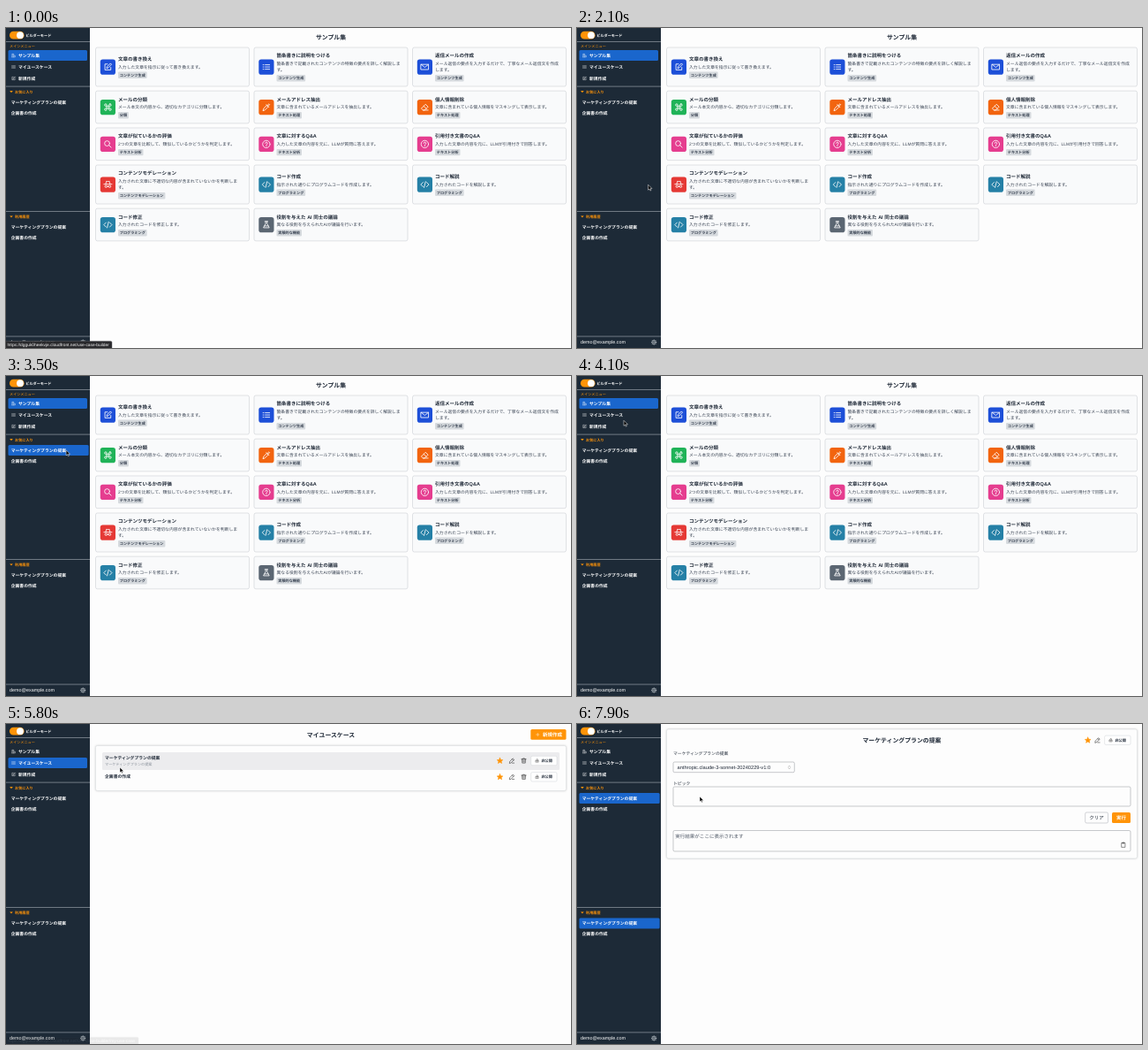
Recreate the animation shown at these times as an HTML page. Size 640 by 362 pixels, loop 8000 ms.

```html
<!DOCTYPE html>
<html lang="ja">
<head>
<meta charset="utf-8">
<title>ユースケースビルダー</title>
<style>
html, body { margin: 0; width: 100%; height: 100%; overflow: hidden; background: #fdfdfd; }
svg { display: block; width: 640px; height: 362px; }
text { font-family: "Liberation Sans", "Noto Sans CJK JP", "Noto Sans CJK", sans-serif; text-rendering: geometricPrecision; white-space: pre; }
.panel { filter: drop-shadow(0 .5px .8px #0003); }
</style>
</head>
<body>
<svg id="stage" viewBox="0 0 640 362"></svg>
<script>
const LOOP = 8000, OPEN_LIST = 4900, OPEN_FORM = 6700;
const ORANGE = '#ff9408', BLUE = '#1a66cc', NAVY = '#1d2a37', INK = '#1f2937';
const XS = 4.15, SM = 4.83, MD = 5.52, XL = 6.9;
const PLAN = 'マーケティングプランの提案', DOC = '企画書の作成';
const SITE = 'https://dgguk0heekvje.cloudfront.net/use-case-builder';

// Icons are drawn in a 24-unit box
const ICONS = {
  edit: 'M11 4H4v16h16v-7M9 15l1-4 9-9 3 3-9 9z',
  list: 'M3 6h2M9 6h12M3 12h2M9 12h12M3 18h2M9 18h12',
  mail: 'M2 5h20v14H2zl10 8 10-8',
  group: 'M18 3a3 3 0 0 0-3 3v12a3 3 0 1 0 3-3H6a3 3 0 1 0 3 3V6a3 3 0 1 0-3 3h12a3 3 0 0 0 0-6z',
  dropper: 'M3 21l2-6 8-8 4 4-8 8zM12 5l7 7M15 7l4-4 2 2-4 4',
  eraser: 'M3 15 14 4l7 7-9 9H8zM9 9l7 7M8 20h13',
  search: 'M17 10a7 7 0 1 0-14 0a7 7 0 1 0 14 0M15 15l6 6',
  help: 'M22 12a10 10 0 1 0-20 0a10 10 0 1 0 20 0M9 9.500a3 3 0 1 1 4 3q-1 .5-1 2M12 17v.5',
  agent: 'M1 11h22M6 11l2-8 4 1 4-1 2 8M10 17a3 3 0 1 0-6 0a3 3 0 1 0 6 0h4a3 3 0 1 0 6 0a3 3 0 1 0-6 0',
  code: 'M7 6l-6 6 6 6M17 6l6 6-6 6M14 4l-4 16',
  flask: 'M8 3h8M10 3v6L4 20h16L14 9V3M7 15h10',
  trash: 'M3 6h18M9 6V3h6v3M5 6l1 15h12l1-15M10 10v7M14 10v7',
  pencil: 'M3 21l1-6L16 3l5 5L9 20zM13 6l5 5M13 21h8',
  lock: 'M5 11h14v9H5zM8 11V7a4 4 0 0 1 8 0v4M12 14v3',
  clip: 'M5 4h14v18H5zM9 2h6v4H9z',
  plus: 'M12 4v16M4 12h16',
  updown: 'M7 9l5-6 5 6M7 15l5 6 5-6',
  books: 'M4 21V4h9v7M4 21h17v-8h-8v8M8 8h1M8 13h1',
  gear: 'M21 12a9 9 0 1 0-18 0a9 9 0 1 0 18 0M15.500 12a3.500 3.500 0 1 0-7 0a3.500 3.500 0 1 0 7 0M12 1v3M12 20v3M1 12h3M20 12h3M4 4l2 2M18 18l2 2M4 20l2-2M18 6l2-2',
  star: 'M12 1l3.300 7.300 8 .8-6 5.300 1.800 7.800L12 18l-7.100 4.200 1.800-7.800-6-5.300 8-.8z'
};

// y is the vertical middle of the line
const text = (s, x, y, size, fill = INK, more = '') =>
  `<text x="${x}" y="${y + size * .37}" font-size="${size}" fill="${fill}" ${more}>${s}</text>`;
const bold = (s, x, y, size, fill, more = '') => text(s, x, y, size, fill, 'font-weight="700" ' + more);
const box = (x, y, w, h, fill, r = 1.5, more = '') =>
  `<rect x="${x}" y="${y}" width="${w}" height="${h}" rx="${r}" fill="${fill}" ${more}/>`;
const icon = (name, x, y, size, color = '#333', fill = 'none') =>
  `<path d="${ICONS[name]}" transform="translate(${x - size / 2} ${y - size / 2}) scale(${size / 24})" fill="${fill}" stroke="${color}" stroke-width="2" stroke-linejoin="round" stroke-linecap="round"/>`;
const outline = c => `stroke="${c}" stroke-width=".45"`;
const rule = y => box(0, y, 95, .5, '#c3c9cf', 0);
const heading = (s, y) => bold(s, 368, y, XL, INK, 'text-anchor="middle"');
const panel = (y, h) => box(101.5, y, 533, h, '#fdfdfd', 2, `class="panel" ${outline('#d5d8dc')}`);

// Sidebar
const links = [
  [31, 'サンプル集', 'books'], [44, 'マイユースケース', 'list'], [57, '新規作成', 'edit'],
  [84, PLAN], [96, DOC], [225.500, PLAN], [237.500, DOC]
];
const linkBox = ([y, , pic]) => ({ x: 2.500, y: y - 5.900, w: pic ? 89.500 : 91.200, h: 11.800 });
const section = (s, y) =>
  `<path d="M4.200 ${y - .9}h3.600l-1.800 2.100z" fill="${ORANGE}"/>` + bold(s, 10, y, XS, ORANGE);
const sidebar = box(0, 0, 95, 362, NAVY, 0)
  + box(4, 3.800, 16.500, 8.800, ORANGE, 4.400) + '<circle cx="16" cy="8.200" r="3.900" fill="#fff"/>'
  + bold('ビルダーモード', 22.300, 8.200, XS, '#fff')
  + [15.500, 65.800, 207, 348.700].map(rule).join('')
  + text('メインメニュー', 4, 20.500, XS, ORANGE)
  + section('お気に入り', 72) + section('利用履歴', 213.300)
  + links.map(link => {
      const [y, label, pic] = link, b = linkBox(link);
      return box(b.x, b.y, b.w, b.h, BLUE, 1.500, 'class="link"')
        + (pic ? icon(pic, 8.500, y, 5, '#fff') : '') + bold(label, pic ? 14 : 5.700, y, SM, '#fff');
    }).join('')
  + text('demo@example.com', 4, 355.500, 5.400, '#fff') + icon('gear', 87.200, 355.500, 6, '#dde2e7');

// Sample cards
const rows = [[44, 44], [89.500, 36.700], [131.300, 36.700], [177, 44], [222.500, 36.700]];
const B = '#1d4fd8', G = '#20b358', O = '#f2640f', P = '#e53d8f', R = '#e53935', T = '#2580a6', S = '#5b6672';
const cards = [
  ['edit', B, '文章の書き換え', 'コンテンツ生成', '入力した文章を指示に従って書き換えます。'],
  ['list', B, '箇条書きに説明をつける', 'コンテンツ生成', '箇条書きで記載されたコンテンツの特徴の要点を詳しく解説しま', 'す。'],
  ['mail', B, '返信メールの作成', 'コンテンツ生成', 'メール返信の要点を入力するだけで、丁寧なメール返信文を作成', 'します。'],
  ['group', G, 'メールの分類', '分類', 'メール本文の内容から、適切なカテゴリに分類します。'],
  ['dropper', O, 'メールアドレス抽出', 'テキスト処理', '文章に含まれているメールアドレスを抽出します。'],
  ['eraser', O, '個人情報削除', 'テキスト処理', '文章に含まれている個人情報をマスキングして表示します。'],
  ['search', P, '文章が似ているかの評価', 'テキスト分析', '2つの文章を比較して、類似しているかどうかを判定します。'],
  ['help', P, '文章に対するQ&amp;A', 'テキスト分析', '入力した文章の内容を元に、LLMが質問に答えます。'],
  ['help', P, '引用付き文書のQ&amp;A', 'テキスト分析', '入力した文章の内容を元に、LLMが引用付きで回答します。'],
  ['agent', R, 'コンテンツモデレーション', 'コンテンツモデレーション', '入力された文章に不適切な内容が含まれていないかを判断しま', 'す。'],
  ['code', T, 'コード作成', 'プログラミング', '指示された通りにプログラムコードを作成します。'],
  ['code', T, 'コード解説', 'プログラミング', '入力されたコードを解説します。'],
  ['code', T, 'コード修正', 'プログラミング', '入力されたコードを修正します。'],
  ['flask', S, '役割を与えた AI 同士の議論', '実験的な機能', '異なる役割を与えられたAIが議論を行います。']
];
const card = ([pic, color, title, tag, ...lines], i) => {
  const x = 101.500 + i % 3 * 179.500, [c, h] = rows[Math.floor(i / 3)];
  const top = c - (lines.length > 1 ? 13 : 9), end = c + (lines.length > 1 ? 12.800 : 9.300);
  return box(x, c - h / 2, 174, h, '#f9fafb', 2, outline('#bcc1c7'))
    + box(x + 5.300, c - 8.500, 17.200, 17.200, color, 2.800) + icon(pic, x + 13.900, c + .1, 10, '#fff')
    + bold(title, x + 25.500, top, MD)
    + lines.map((s, n) => text(s, x + 25.500, top + 8.800 + 7 * n, SM, '#374151')).join('')
    + box(x + 25.500, end - 3.700, tag.length * XS + 3.600, 7.300, '#d6dade', 1)
    + bold(tag, x + 27.300, end, XS, '#374151');
};
const samples = heading('サンプル集', 10.500) + cards.map(card).join('');

// Saved use cases
const shareButton = (x, y) => box(x, y - 5.200, 29.300, 10.400, '#fff', 1.500, outline('#c9cdd2'))
  + icon('lock', x + 7, y, 5) + bold('非公開', x + 11.700, y, XS);
const tools = y => icon('star', 559.500, y, 7, ORANGE, ORANGE) + icon('pencil', 573, y, 7)
  + icon('trash', 586.500, y, 7) + shareButton(594.700, y);
const list = heading('マイユースケース', 12)
  + box(594.300, 6, 40.200, 11.700, ORANGE) + icon('plus', 602.300, 12, 5, '#fff') + bold('新規作成', 607.900, 12, MD, '#fff')
  + panel(24.500, 51) + box(109, 32, 518, 20, '#ececee', 1.500, 'id="row"')
  + bold(PLAN, 112, 38.500, SM) + text(PLAN, 112, 45, XS, '#8b929c') + bold(DOC, 112, 59.700, SM)
  + tools(41.500) + tools(59.800);

// Run form
const field = (y, w, h) => box(109, y, w, h, '#fdfdfd', 1.500, outline('#82878d'));
const form = panel(6, 146) + heading(PLAN, 18.300)
  + icon('star', 578.700, 18.300, 7, ORANGE, ORANGE) + icon('pencil', 589.500, 18.300, 7) + shareButton(597.700, 18.300)
  + text(PLAN, 109, 33.300, SM)
  + field(43, 137.300, 11.700) + text('anthropic.claude-3-sonnet-20240229-v1:0', 113.500, 49, 5.700) + icon('updown', 240.500, 49, 5, '#777')
  + text('トピック', 109, 67, SM) + field(71, 518, 22)
  + box(575.700, 100, 25.800, 12, '#fdfdfd', 1.500, outline('#9aa0a7')) + text('クリア', 580.300, 106, MD)
  + box(606, 100, 21, 12, ORANGE) + bold('実行', 611, 106, MD, '#fff')
  + field(120.500, 518, 23.500) + text('実行結果がここに表示されます', 111.300, 127, MD, '#4b5563') + icon('clip', 619, 136.700, 6.500);

const status = (id, url, w) => `<g id="${id}">` + box(-3, 354.200, w + 3, 12, '#29292c', 1.500, outline('#66666a'))
  + text(url, 1.500, 358.400, 4.870, '#f4f4f4') + '</g>';

const $ = id => document.getElementById(id);
$('stage').innerHTML = box(0, 0, 640, 362, '#fdfdfd', 0)
  + [samples, list, form].map((s, i) => `<g id="page${i}">${s}</g>`).join('') + sidebar
  + status('status0', SITE, 120) + status('status1', SITE + '/my-use-case', 150)
  + '<path id="cursor" d="M0 0v6l1.400-1.200 .9 2 1-.4-.9-2h2z" fill="#000" stroke="#fff" stroke-width=".5"/>';
const linkMarks = document.querySelectorAll('.link');

// Pointer stops: time, x, y
const stops = [
  [900, 23, 317], [1200, 59.500, 318], [1300, 59.500, 318], [2500, 88, 128], [2900, 88, 128],
  [4000, 53, 50.300], [4300, 53, 50.300], [4600, 52.500, 47.500], [5200, 52.500, 47.500],
  [5800, 129, 49], [6200, 127, 42], [6600, 127, 42], [7700, 139, 82], [LOOP, 139, 82]
];
const clamp = v => Math.max(0, Math.min(1, v));
function pointer(t) {
  const n = Math.max(1, stops.findIndex(s => s[0] > t));
  const [t0, x0, y0] = stops[n - 1], [t1, x1, y1] = stops[n];
  const p = clamp((t - t0) / (t1 - t0)), k = p * p * (3 - 2 * p);
  return [x0 + (x1 - x0) * k, y0 + (y1 - y0) * k];
}

const show = (el, on) => el.setAttribute('opacity', +on);
function draw(now) {
  const t = Math.floor(now % LOOP / 100) * 100; // ten steps a second
  const [x, y] = pointer(t), page = t < OPEN_LIST ? 0 : t < OPEN_FORM ? 1 : 2;
  const over = b => t >= 700 && x >= b.x && x <= b.x + b.w && y >= b.y && y <= b.y + b.h;
  const active = [[0], [1], [3, 5]][page];
  for (let i = 0; i < 3; i++) show($('page' + i), i === page);
  linkMarks.forEach((el, i) => show(el, active.includes(i) || over(linkBox(links[i]))));
  show($('row'), over({ x: 109, y: 32, w: 518, h: 20 }));
  show($('status0'), clamp(1 - t / 300));
  show($('status1'), t < 4800 ? 0 : clamp(1 - (t - 5500) / 330));
  show($('cursor'), t >= 700);
  $('cursor').setAttribute('transform', `translate(${x} ${y})`);
  requestAnimationFrame(() => draw(performance.now() - start));
}
const start = performance.now();
draw(0);
</script>
</body>
</html>
```
